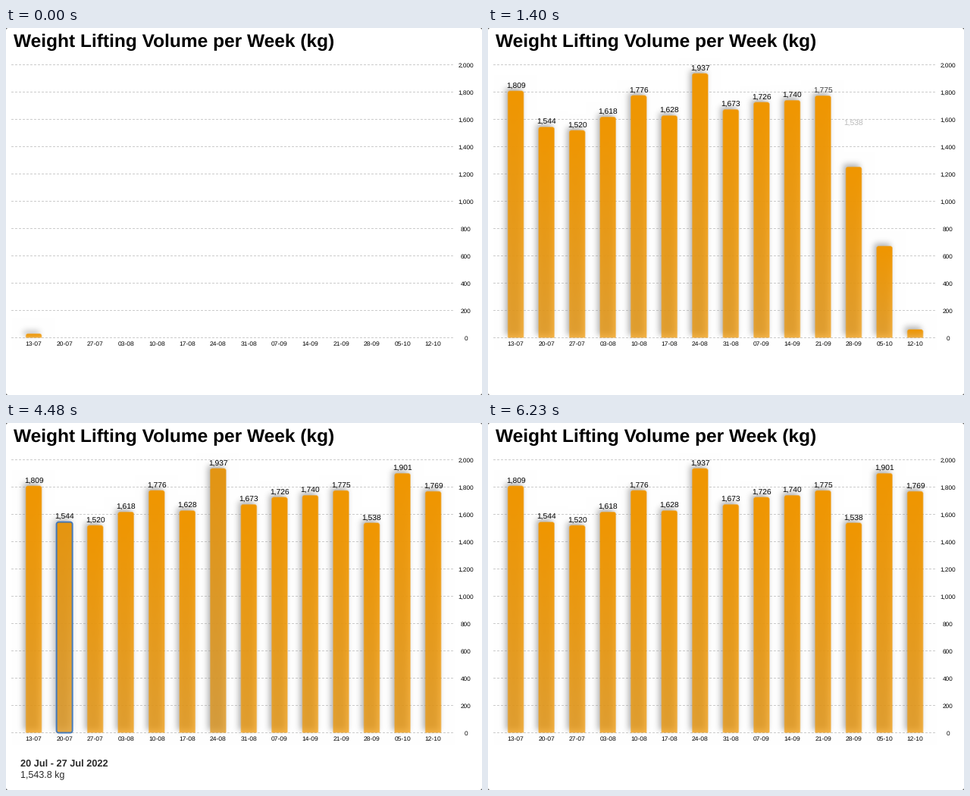
Recreate the animation shown at these times as a matplotlib script. Size 628 by 484 pixels, loop 7210 ms.

```python
import math

import numpy as np
import matplotlib.pyplot as plt
from matplotlib.animation import FuncAnimation
from matplotlib.patches import FancyBboxPatch

W, H, DPI = 628, 484, 100
STEP, FRAMES = 70, 103
BASE, PX_PER_KG = 408.5, 0.18
BAR_W, RADIUS, MARGIN = 21, 3, 18

DATES = ["13-07", "20-07", "27-07", "03-08", "10-08", "17-08", "24-08",
         "31-08", "07-09", "14-09", "21-09", "28-09", "05-10", "12-10"]
VALUES = [1809, 1544, 1520, 1618, 1776, 1628, 1937,
          1673, 1726, 1740, 1775, 1538, 1901, 1769]
CENTERS = [36.6 + 40.54 * i for i in range(len(VALUES))]

# bar index, press time, release time, caption
SELECTIONS = [
    (1, 2520, 4480, "20 Jul - 27 Jul 2022", "1,543.8 kg"),
    (6, 4480, 5880, "24 Aug - 31 Aug 2022", "1,937 kg"),
]

ORANGE = np.array([240, 150, 0])
GRAY = np.array([142, 142, 142])
BLUE = np.array([42, 110, 196])

plt.rcParams["font.family"] = "Liberation Sans"
plt.rcParams["text.hinting"] = "none"


def ramp(t, start, length):
    return min(max((t - start) / length, 0.0), 1.0)


def ease(u, p=1.75):
    return u ** p / (u ** p + (1 - u) ** p)


def pulse(age):
    """Quick swell after a press, then a slow settle."""
    if age <= 0 or age >= 770:
        return 0.0
    if age < 160:
        return 0.05 * ease(age / 160)
    return 0.05 * (1 - (age - 160) / 610) ** 2.5


def blurred_span(points, lo, hi, sigma):
    k = sigma * math.sqrt(2)
    return np.array([(math.erf((hi - p) / k) - math.erf((lo - p) / k)) / 2
                     for p in points])


def rounded_distance(xs, ys, left, right, top, bottom, r):
    qx = np.abs(xs - (left + right) / 2) - (right - left) / 2 + r
    qy = np.abs(ys - (top + bottom) / 2) - (bottom - top) / 2 + r
    outside = np.hypot(np.maximum(qx, 0), np.maximum(qy, 0))
    return outside + np.minimum(np.maximum(qx, qy), 0) - r


def paint(area, color, alpha):
    area += (color - area) * alpha[..., None]


def make_background():
    img = np.full((H, W, 3), 255.0)
    xs = np.arange(7, 592)
    for k in range(11):
        img[48 + 36 * k, xs[(xs - 7) % 5 < 3]] = 204
    return img


def draw_bar(img, cx, height, dim, outline):
    left, right, top = cx - BAR_W / 2, cx + BAR_W / 2, BASE - height
    c0, c1 = int(left) - MARGIN, int(right) + MARGIN
    r0, r1 = max(int(top) - 20, 0), 424
    c0 = max(c0, 0)
    area = img[r0:r1, c0:c1]
    x = np.arange(c0, c1) + 0.5
    y = np.arange(r0, r1) + 0.5
    xs, ys = x[None, :], y[:, None]

    sigma = 4 + 1.5 * outline
    shadow = np.outer(blurred_span(y, top - 3.5, BASE - 3.5, sigma),
                      blurred_span(x, left - 3, right - 3, sigma))
    paint(area, GRAY, 0.7 * shadow)

    d = rounded_distance(xs, ys, left, right, top, BASE + 10, RADIUS)
    cover = np.clip(0.5 - d / 1.6, 0, 1) * np.clip(BASE + 0.5 - ys, 0, 1)
    fade = 1 - 0.28 * np.clip((ys - top) / height, 0, 1)
    paint(area, ORANGE, cover * fade)
    if dim:
        paint(area, GRAY, cover * 0.13 * dim)
    if outline:
        d = rounded_distance(xs, ys, left, right, top, BASE, RADIUS)
        paint(area, BLUE, np.clip(1.5 - np.abs(d), 0, 1) * outline)


fig = plt.figure(figsize=(W / DPI, H / DPI), dpi=DPI, facecolor="#555555")
ax = fig.add_axes([0, 0, 1, 1])
ax.set_xlim(0, W)
ax.set_ylim(H, 0)
ax.axis("off")


def text(x, y, s, px, ha="center", **style):
    return ax.text(x, y, s, fontsize=px * 72 / DPI, ha=ha, va="baseline",
                   color="black", **style)


background = make_background()
picture = ax.imshow(background / 255, extent=(0, W, H, 0), aspect="auto",
                    interpolation="nearest")
window = FancyBboxPatch((0, 0), W, H, transform=ax.transData,
                        boxstyle="round,pad=0,rounding_size=3")
picture.set_clip_path(window.get_path(), ax.transData)

text(9.5, 24.9, "Weight Lifting Volume per Week (kg)", 24.5, "left",
     weight="bold")
for k in range(11):
    text(606.9, 51.5 + 36 * k, f"{2000 - 200 * k:,}", 8.3)
for cx, date in zip(CENTERS, DATES):
    text(cx, 418.9, date, 8.5)
labels = [text(cx, 0, f"{v:,}", 10.3) for cx, v in zip(CENTERS, VALUES)]
captions = [(text(18.8, 453, title, 12.8, "left", weight="bold"),
             text(18.8, 468.3, amount, 12.5, "left"))
            for _, _, _, title, amount in SELECTIONS]


def update(frame):
    t = frame * STEP
    img = background.copy()
    dim = [0.0] * len(VALUES)
    outline = [0.0] * len(VALUES)
    swell = [0.0] * len(VALUES)

    for (bar, press, release, *_), lines in zip(SELECTIONS, captions):
        leaving = ramp(t, release - STEP, 420) if t >= release else 0.0
        shown = ramp(t, press, 280) * (1 - leaving)
        dim[bar] = float(t >= press) * (1 - leaving)
        outline[bar] = shown
        swell[bar] = pulse(t - press)
        for line in lines:
            line.set_alpha(shown)

    for i, (cx, value) in enumerate(zip(CENTERS, VALUES)):
        grown = ease(ramp(t, 106.5 * i - 33, 374))
        full = value * PX_PER_KG * (1 + swell[i])
        if grown > 0:
            draw_bar(img, cx, full * grown, dim[i], outline[i])
        labels[i].set_y(BASE - full - 3.4)
        labels[i].set_alpha(ramp(t, 121 * i, 250) * (1 - 12 * swell[i]))

    picture.set_data(np.clip(img / 255, 0, 1))
    return [picture, *labels]


animation = FuncAnimation(fig, update, frames=FRAMES, interval=STEP,
                          repeat=True, repeat_delay=0, blit=False)
plt.show()
```
